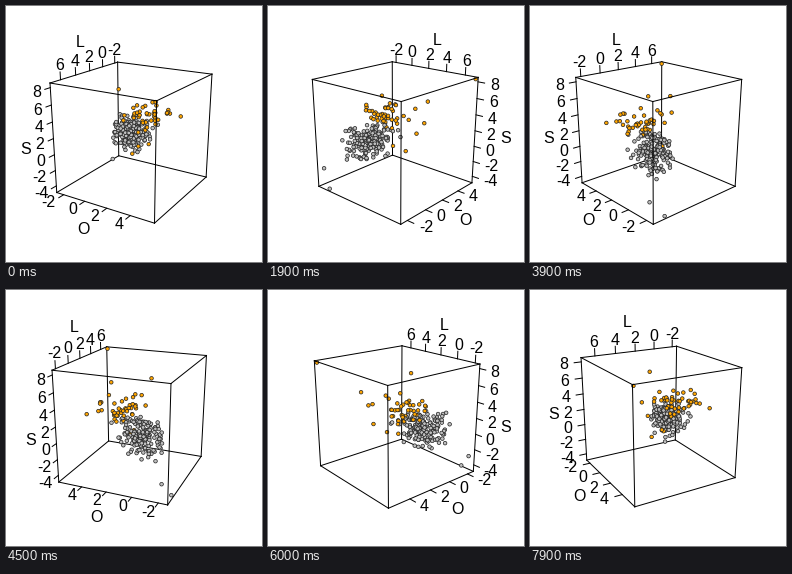
Write a matplotlib script that moves like this. It is 256 px wide and 256 px high and loops after 8000 ms.

```python
import numpy as np
import matplotlib.pyplot as plt
from itertools import product
from matplotlib.animation import FuncAnimation

SIZE, FRAMES, STEP = 256, 80, 100
DIST, FOCAL, CENTER = 8.48, 478, (128, 127.6)
TILT = np.radians(20)
GRAY, GOLD = "#bebebe", "#ffa500"
TICK, LABEL, TITLE, SIDE = 0.133, 0.267, 0.54, 0.13
FONT = dict(family="Liberation Sans", size=16, ha="center", va="baseline")
CAP = 5.8  # half the height of a capital

# name: (middle, half range, tick values)
SCALES = {
    "L": (2.4, 4.9, range(-2, 7, 2)),
    "O": (1.63, 4.32, range(-2, 5, 2)),
    "S": (1.82, 6.7, range(-4, 9, 2)),
}


def project(p, angle):
    """Map (L, O, S) in the unit cube to screen x, y and nearness."""
    l, o, s = np.asarray(p, float).T
    c, d = np.cos(angle), np.sin(angle)
    x, z = c * l - d * o, -d * l - c * o
    near = z * np.cos(TILT) + s * np.sin(TILT)
    up = s * np.cos(TILT) - z * np.sin(TILT)
    k = FOCAL / (DIST - near)
    return CENTER[0] + k * x, CENTER[1] - k * up, near


def make_points():
    rng = np.random.default_rng(12)

    def cloud(n, mid, spread, shared):
        common = rng.normal(size=(n, 1))
        own = np.clip(rng.normal(size=(n, 3)), -2.2, 2.2)
        return np.array(mid) + own * spread + common * shared

    gray = cloud(180, (-0.37, -0.31, -0.15), (0.16, 0.17, 0.15), (0.08, 0.10, 0.05))
    gray[:, 2] -= 1.6 * np.maximum(gray[:, 2] - 0.1, 0)
    low = [(-0.97, -0.88, -0.67), (-0.73, -0.97, -0.97)]
    gold = cloud(38, (-0.29, 0.05, 0.26), (0.19, 0.19, 0.14), (0.03, 0.04, 0.03))
    far = [
        (0.97, 0.97, 0.97), (-0.02, -0.33, 0.76), (0.26, 0.56, 0.52),
        (-0.71, 0.56, 0.22), (0.38, 0.32, 0.20), (0.31, -0.02, 0.33),
        (0.15, 0.39, -0.07), (0.17, 0.07, -0.31), (-0.10, 0.03, -0.27),
    ]
    pts = np.vstack([gray, low, gold, far])
    hues = np.array([GRAY] * (len(gray) + len(low)) + [GOLD] * (len(gold) + len(far)))
    return pts, hues


def axis_places(angle):
    """Give each axis its edge, tick direction and title side."""
    near_l = 1 if -np.sin(angle) > 0 else -1
    far_o = 1 if np.cos(angle) > 0 else -1
    places = {
        "L": ((0, far_o, 1), (0, 0, 1), (0, far_o, 0)),
        "O": ((near_l, 0, -1), (near_l, 0, 0), (0, 0, -1)),
        "S": ((near_l, far_o, 0), (near_l, 0, 0), (0, far_o, 0)),
    }
    if abs(np.sin(angle)) < 0.05:  # seen end-on
        places["O"] = ((-near_l, 0, 1), (0, 0, 1), (-near_l, 0, 0))
    return places


fig = plt.figure(figsize=(SIZE / 72, SIZE / 72), dpi=72, facecolor="white")
ax = fig.add_axes([0, 0, 1, 1])
ax.set(xlim=(0, SIZE), ylim=(SIZE, 0))
ax.axis("off")


def new_line():
    return ax.plot([], [], color="black", lw=1)[0]


def new_text(text):
    return ax.text(0, 0, text, zorder=4, **FONT)


corners = list(product((-1, 1), repeat=3))
edges = [(a, b) for a, b in product(corners, corners)
         if a < b and sum(u != v for u, v in zip(a, b)) == 1]
box = [new_line() for _ in edges]
ticks = {k: [(v, new_line(), new_text(str(v))) for v in sc[2]]
         for k, sc in SCALES.items()}
titles = {k: new_text(k) for k in SCALES}
points, hues = make_points()
dots = ax.scatter(points[:, 0], points[:, 1], s=3.6 ** 2, c=hues,
                  edgecolors="#222222", linewidths=0.7, zorder=2)


def draw_axis(name, place, angle):
    base, out, side = (np.array(v, float) for v in place)
    along = "LOS".index(name)
    mid, half, _ = SCALES[name]
    for value, line, text in ticks[name]:
        p = base.copy()
        p[along] = (value - mid) / half
        x, y, _ = project([p, p + TICK * out, p + LABEL * out], angle)
        line.set_data(x[:2], y[:2])
        lean = (x[2] - x[0]) / np.hypot(x[2] - x[0], y[2] - y[0])
        text.set_position((x[2] + 3 * len(text.get_text()) * lean, y[2] + CAP))
    x, y, _ = project([base + TITLE * out + SIDE * side], angle)
    titles[name].set_position((x[0], y[0] + CAP))


def update(i):
    angle = np.radians(4.2 * (i - 29))
    for line, edge in zip(box, edges):
        x, y, near = project(edge, angle)
        line.set_data(x, y)
        line.set_zorder(3 if near.mean() > 0 else 1)
    for name, place in axis_places(angle).items():
        draw_axis(name, place, angle)
    x, y, near = project(points, angle)
    order = np.argsort(near)
    dots.set_offsets(np.column_stack([x, y])[order])
    dots.set_facecolor(hues[order])


anim = FuncAnimation(fig, update, frames=FRAMES, interval=STEP,
                     repeat=True, repeat_delay=0, blit=False)
plt.show()
```
